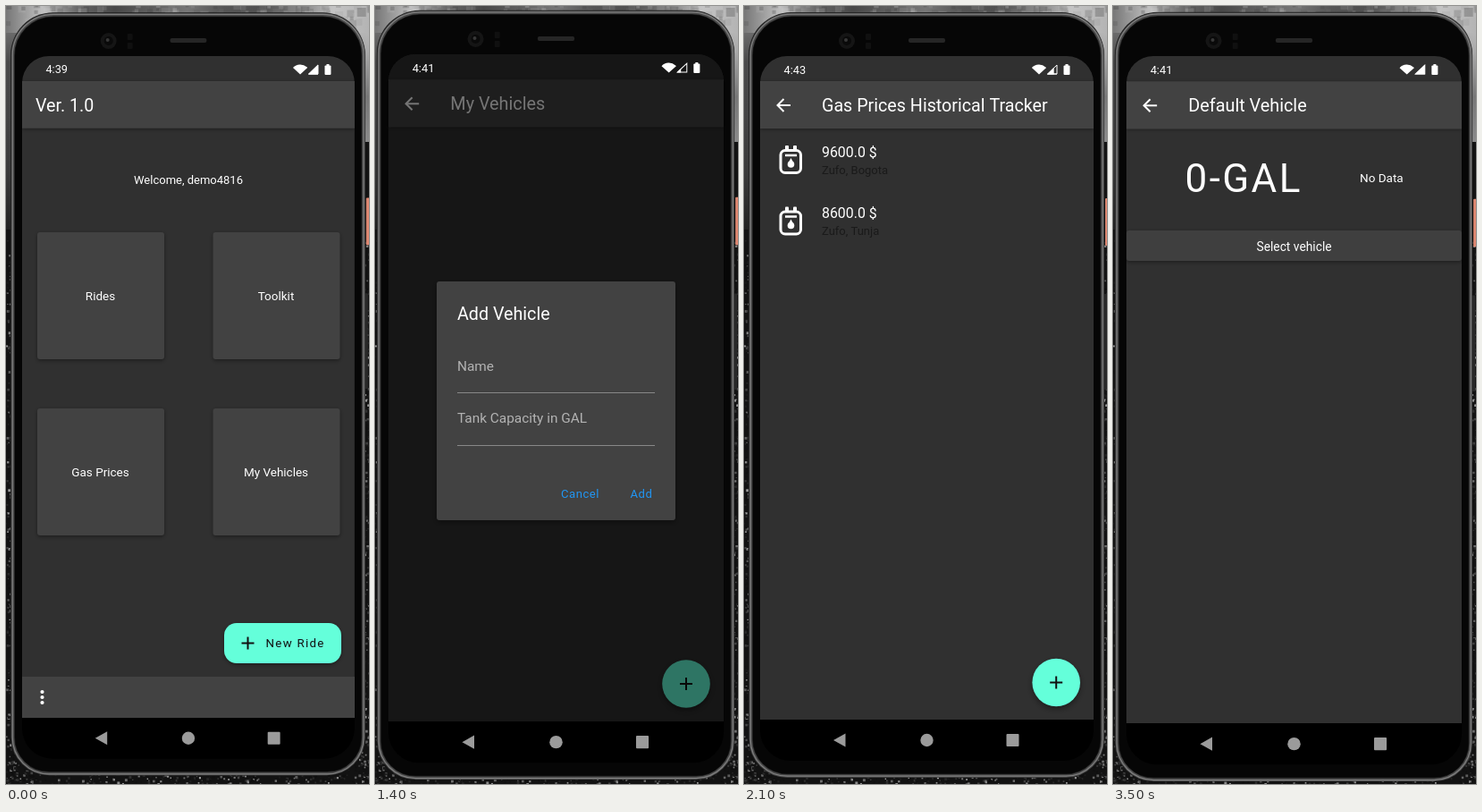
An HTML page with a canvas for the animation above (4.2 s loop, 406 by 870 pixels).

```html
<!DOCTYPE html>
<html lang="en">
<head>
<meta charset="utf-8">
<title>Ride app screens</title>
<style>
html, body { margin: 0; height: 100%; overflow: hidden; background: #111; }
canvas { display: block; }
</style>
</head>
<body>
<canvas id="stage" width="406" height="870"></canvas>
<script>
const ctx = document.getElementById('stage').getContext('2d');
const MINT = '#64ffda', CARD = '#424242', BUTTON = '#3f3f3f', BODY = '#303030', WHITE = '#fff';
const HOLD = 700;

function box(x, y, w, h, r, color) {
  ctx.fillStyle = color;
  ctx.beginPath();
  ctx.roundRect(x, y, w, h, r);
  ctx.fill();
}

function outline(x, y, w, h, r, color, width) {
  ctx.strokeStyle = color;
  ctx.lineWidth = width;
  ctx.beginPath();
  ctx.roundRect(x, y, w, h, r);
  ctx.stroke();
}

function disc(x, y, r, color) {
  ctx.fillStyle = color;
  ctx.beginPath();
  ctx.arc(x, y, r, 0, 7);
  ctx.fill();
}

function shape(points, color) {
  ctx.fillStyle = color;
  ctx.beginPath();
  points.forEach(([x, y]) => ctx.lineTo(x, y));
  ctx.closePath();
  ctx.fill();
}

function line(points, color, width) {
  ctx.strokeStyle = color;
  ctx.lineWidth = width;
  ctx.beginPath();
  points.forEach(([x, y]) => ctx.lineTo(x, y));
  ctx.stroke();
}

// y is the middle of the capital letters
function text(str, x, y, size, { color = WHITE, align = 'left', weight = 400, spacing = 0 } = {}) {
  ctx.font = `${weight} ${size}px Roboto, sans-serif`;
  ctx.letterSpacing = spacing + 'px';
  ctx.textAlign = align;
  ctx.fillStyle = color;
  ctx.fillText(str, x, y + size * 0.355);
}

const centered = (str, x, y, size, weight) => text(str, x, y, size, { align: 'center', weight });

function raised(draw, blur = 4, drop = 1.5) {
  ctx.save();
  ctx.shadowColor = 'rgba(0,0,0,.4)';
  ctx.shadowBlur = blur;
  ctx.shadowOffsetY = drop;
  draw();
  ctx.restore();
}

const card = (x, y, w, h, r = 3, color = CARD) => raised(() => box(x, y, w, h, r, color));

function plus(x, y) {
  line([[x - 7, y], [x + 7, y]], '#111', 2);
  line([[x, y - 7], [x, y + 7]], '#111', 2);
}

function fab(x, y) {
  raised(() => disc(x, y, 26.8, MINT), 6, 3);
  plus(x, y);
}

function gradient(x1, y1, x2, y2, colors) {
  const g = ctx.createLinearGradient(x1, y1, x2, y2);
  colors.forEach((color, i) => g.addColorStop(i / (colors.length - 1), color));
  return g;
}

// Grainy monochrome scenery behind the phone
function backdrop() {
  let seed = 7;
  const rand = () => (seed = seed * 16807 % 2147483647) / 2147483647;
  const speck = (x, y, size, grey) => box(x, y, size, size, 0, `rgb(${grey},${grey},${grey})`);
  box(0, 0, 406, 870, 0, '#121212');
  box(0, 0, 20, 250, 0, gradient(0, 0, 0, 250, ['#888', '#4a4a4a', '#444', '#3a3a3a', '#222']));
  box(386, 0, 20, 152, 0, gradient(0, 0, 0, 152, ['#c4c4c4', '#aaa', '#777', '#8a8a8a']));
  box(0, 0, 406, 30, 0, gradient(0, 0, 406, 0,
    ['#777', '#c0c0c0', '#666', '#484848', '#606060', '#777', '#555', '#505050', '#777', '#c4c4c4', '#b4b4b4']));
  for (let i = 0; i < 140; i++) {
    ctx.globalAlpha = .25;
    speck(rand() * 406, rand() * 24 - 5, 3 + rand() * 7, 40 + 190 * rand());
  }
  ctx.globalAlpha = 1;
  for (let i = 0; i < 1500; i++) {
    const edge = i % 3;
    const x = edge === 0 ? rand() * 12 : edge === 1 ? 394 + rand() * 12 : rand() * 406;
    const y = edge === 2 ? 845 + rand() * 25 : 260 + rand() * 610;
    speck(x, y, 1 + rand() * 2, 15 + 150 * rand() ** 3);
  }
}

function body() {
  box(386, 159, 4, 53, 1, '#dc8670');
  box(384, 266, 4, 107, 1, '#292929');
  box(-13, -49, 398, 856, [48, 48, 43, 43], '#1b1b1b');
  outline(-10.5, -46.5, 393.5, 851.5, [46, 46, 41, 41], '#484848', 3.5);
  outline(-10.8, -46.8, 394, 852, [46, 46, 41, 41], '#808080', 1.2);
  box(-8, -44, 388.5, 846.5, [43, 43, 38, 38], '#060606');
  disc(97, -17, 9, '#151515');
  disc(97, -17, 5, '#0a0a0a');
  disc(96, -18, 2, '#383838');
  box(118, -25, 6, 7, 1, '#101010');
  box(118, -15, 6, 7, 1, '#101010');
  box(166, -20, 41, 5, 2, '#262626');
  box(0, 0, 373, 788, [30, 30, 34, 34], '#000');
  box(0, 0, 373, 742, [30, 30, 0, 0], BODY);
}

function appBar(title, back) {
  raised(() => box(0, 28, 373, 53, 0, CARD), 4, 1);
  text(title, back ? 69 : 15, 55, 19.7);
  if (!back) return;
  line([[19.5, 55], [34, 55]], WHITE, 2);
  line([[26.5, 48], [19.5, 55], [26.5, 62]], WHITE, 2);
}

function statusBar(time, signal) {
  text(time, 26.5, 15, 12.8);
  ctx.fillStyle = WHITE;
  ctx.beginPath();
  ctx.moveTo(312, 20.5);
  ctx.arc(312, 20.5, 11, -2.4, -0.74);
  ctx.fill();
  line([[321.5, 20], [332, 20], [332, 10], [321.5, 20], [332, 20]], WHITE, 1);
  const fill = 11 * signal;
  shape([[321, 20.5], [321 + fill, 20.5], [321 + fill, 20.5 - fill]], WHITE);
  box(339.5, 10.5, 7, 10.5, 1, WHITE);
  box(341.5, 9, 3, 2, 0, WHITE);
}

function navBar() {
  shape([[82, 765], [95.5, 757.5], [95.5, 772.5]], '#9b9b9b');
  disc(186.5, 765, 7.2, '#9b9b9b');
  box(275.5, 758, 14, 14, 1, '#9b9b9b');
}

function home() {
  centered('Welcome, demo4816', 204, 194, 13);
  [['Rides', 35, 253], ['Toolkit', 231.5, 253], ['Gas Prices', 35, 450], ['My Vehicles', 231.5, 450]]
    .forEach(([label, x, y]) => {
      card(x, y, 142, 142);
      centered(label, x + 70.5, y + 71, 13.5);
    });
  card(244, 690, 131, 45, 14, MINT);
  plus(270.5, 712.5);
  text('New Ride', 290.5, 712.5, 13.3, { color: '#111', spacing: 1.3 });
  box(18, 750, 372, 46, 0, CARD);
  [767, 773, 779].forEach(y => disc(40.5, y, 2.1, WHITE));
}

function toolKit() {
  text('Gallons to Liters', 31, 224, 13.2);
  box(142, 217, 29, 13, 6.5, '#292929');
  disc(167, 224, 9.5, '#232323');
  text('Enter the value', 31, 289, 15.4, { color: '#999' });
  line([[31, 319.5], [374, 319.5]], '#606060', 1.5);
  card(31, 341, 343, 33, 3, BUTTON);
  centered('Convert', 202.5, 358, 13.8);
  text('Result:', 31, 405, 13.6);
}

function addVehicle() {
  fab(348, 758);
  box(15, 54, 375, 746, [30, 30, 0, 0], 'rgba(0,0,0,.54)');
  raised(() => box(69, 308, 267, 267, 3, CARD), 6, 2);
  text('Add Vehicle', 92, 344, 19.7);
  text('Name', 92, 403, 15.4, { color: '#b3b3b3' });
  text('Tank Capacity in GAL', 92, 461, 15.4, { color: '#b3b3b3' });
  [432.5, 491.5].forEach(y => line([[92, y], [313, y]], '#888', 1));
  const action = { color: '#2196f3', spacing: .5 };
  text('Cancel', 208, 545, 13.1, action);
  text('Add', 285.5, 545, 13.1, action);
}

function fuelIcon(x, y) {
  outline(x - 11, y - 10.5, 22.5, 25, 5, WHITE, 3);
  box(x - 6, y - 16, 4, 5, 1, WHITE);
  box(x + 3, y - 16, 4, 5, 1, WHITE);
  line([[x - 6, y - 5], [x + 7, y - 5]], WHITE, 2.5);
  shape([[x + .5, y - 2], [x + 4, y + 4.5], [x - 3, y + 4.5]], WHITE);
  disc(x + .5, y + 5, 3.8, WHITE);
}

function prices() {
  [['9600.0 $', 'Zufo, Bogota', 172], ['8600.0 $', 'Zufo, Tunja', 240.5]].forEach(([price, place, y]) => {
    fuelIcon(52, y);
    text(price, 87, y - 9, 15.9);
    text(place, 87, y + 11, 13, { color: '#1a1a1a' });
  });
  fab(349.2, 756.5);
}

function rideAnalyzer() {
  disc(202.5, 310, 133, CARD);
  disc(202.5, 310, 114, '#333');
  disc(202.5, 310, 112.5, '#575757');
  disc(202.5, 186.5, 9.8, MINT);
  centered('00:00:08', 202.5, 310.5, 33, 500);
  [['Press Go and enjoy the ride,', 490.5], ['Zelnu will notify when the ride is done', 508],
   ['Current Vehicle: Tovrek', 534], ['Current Price per Gallon: $8600.0', 551.5]]
    .forEach(([str, y]) => centered(str, 202, y, 12.9));
  card(16, 577, 373, 47, 3, BUTTON);
  centered('Stop now and Analyze', 202.5, 601, 13.7);
}

function defaultVehicle() {
  text('0-GAL', 80.5, 192.5, 44, { spacing: 2.4 });
  text('No Data', 276, 192, 13.5);
  card(15, 251, 375, 34, 3, BUTTON);
  centered('Select vehicle', 202.5, 269, 13.8);
}

const scenes = [
  { x: 18, y: 56, scale: .997, time: '4:39', signal: 1, title: 'Ver. 1.0', draw: home },
  { x: 16, y: 56, scale: 1, time: '4:40', signal: .5, title: 'Tool Kit', draw: toolKit },
  { x: 15, y: 54, scale: 1.0054, time: '4:41', signal: .4, title: 'My Vehicles', draw: addVehicle },
  { x: 18, y: 56, scale: 1, time: '4:43', signal: .7, title: 'Gas Prices Historical Tracker', draw: prices },
  { x: 16, y: 57, scale: 1, time: '4:47', signal: .5, title: 'Ride Analyzer', draw: rideAnalyzer },
  { x: 15, y: 56, scale: 1.0054, time: '4:41', signal: 1, title: 'Default Vehicle', draw: defaultVehicle },
];

function onPhone({ x, y, scale }, draw) {
  ctx.save();
  ctx.translate(x, y);
  ctx.scale(scale, scale);
  draw();
  ctx.restore();
}

function render(scene) {
  backdrop();
  onPhone(scene, () => {
    body();
    appBar(scene.title, scene.draw !== home);
  });
  scene.draw();
  onPhone(scene, () => {
    statusBar(scene.time, scene.signal);
    navBar();
  });
}

let shown = -1;
function tick() {
  const index = Math.floor(performance.now() / HOLD) % scenes.length;
  if (index !== shown) render(scenes[shown = index]);
  requestAnimationFrame(tick);
}
tick();
</script>
</body>
</html>
```
